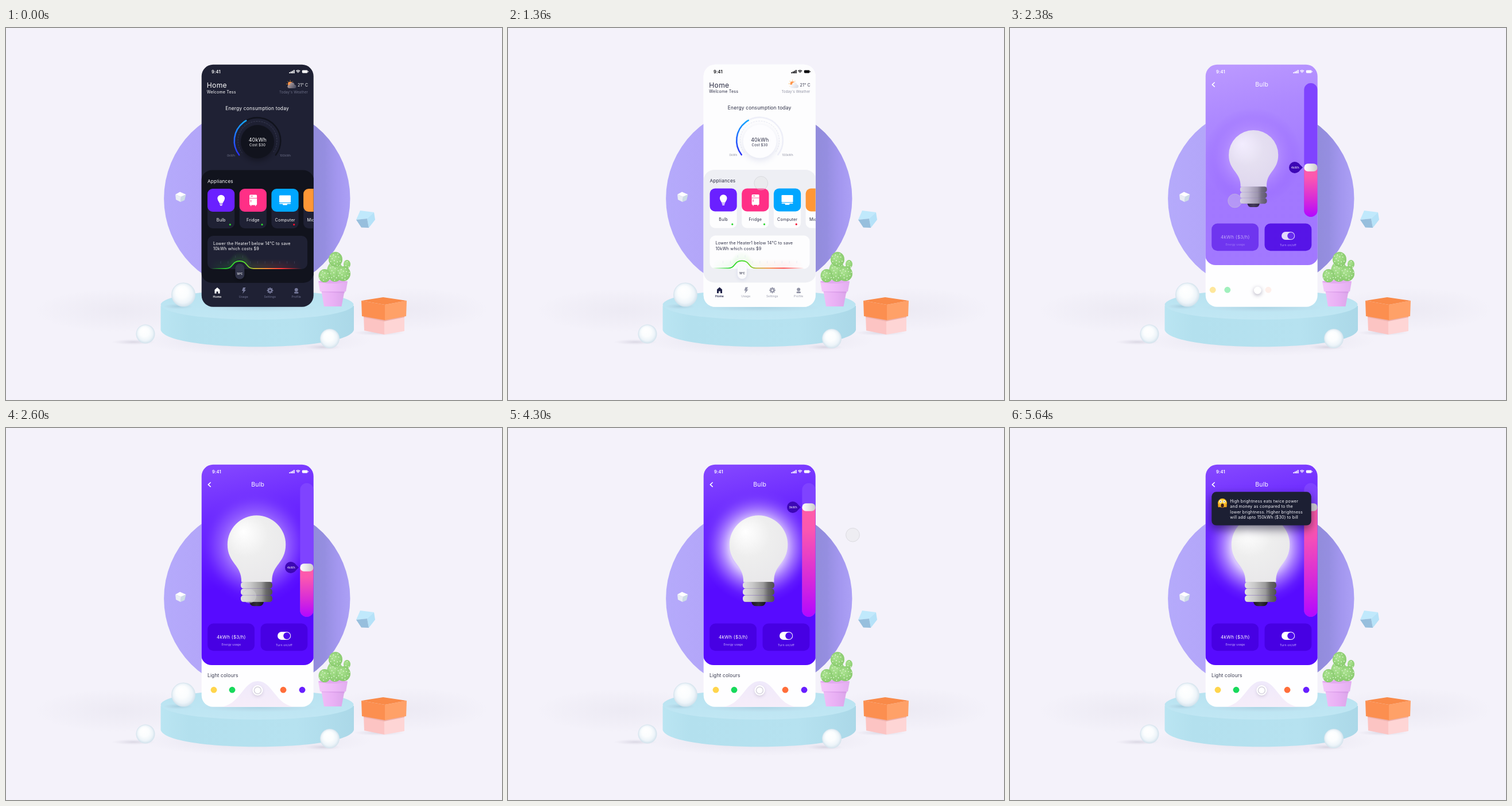
Write an HTML page with a canvas that moves like this. It is 864x648 px and loops after 6.26 s.

```html
<!DOCTYPE html>
<html lang="en">
<head>
<meta charset="utf-8">
<title>Smart home app</title>
<style>
html, body { margin: 0; width: 100%; height: 100%; overflow: hidden; background: #f4f2fa; }
canvas { display: block; }
</style>
</head>
<body>
<canvas id="stage" width="864" height="648"></canvas>
<script>
const LOOP = 6260;
const FONT = 'Inter, "Open Sans", sans-serif';
const stage = document.getElementById('stage').getContext('2d');
let g = stage;

// ---------- helpers ----------
const clamp = v => Math.max(0, Math.min(1, v));
const mix = (a, b, p) => a + (b - a) * p;
const easeOut = p => 1 - (1 - p) ** 2;

function fade(alpha, draw) {
  if (alpha <= 0) return;
  g.save();
  g.globalAlpha *= alpha;
  draw();
  g.restore();
}
function stops(grad, colors) {
  colors.forEach((c, i) => Array.isArray(c) ? grad.addColorStop(c[0], c[1]) : grad.addColorStop(i / (colors.length - 1), c));
  return grad;
}
const linear = (x0, y0, x1, y1, ...c) => stops(g.createLinearGradient(x0, y0, x1, y1), c);
const radial = (x0, y0, x1, y1, r, ...c) => stops(g.createRadialGradient(x0, y0, 0, x1, y1, r), c);

function rect(x, y, w, h, r, fill) {
  g.beginPath();
  g.roundRect(x, y, w, h, r);
  g.fillStyle = fill;
  g.fill();
}
function disc(x, y, rx, fill, ry = rx) {
  g.beginPath();
  g.ellipse(x, y, rx, ry, 0, 0, Math.PI * 2);
  g.fillStyle = fill;
  g.fill();
}
function poly(fill, ...pts) {
  g.beginPath();
  for (let i = 0; i < pts.length; i += 2) g.lineTo(pts[i], pts[i + 1]);
  g.closePath();
  g.fillStyle = fill;
  g.fill();
}
function line(color, width, ...pts) {
  g.beginPath();
  for (let i = 0; i < pts.length; i += 2) g.lineTo(pts[i], pts[i + 1]);
  g.strokeStyle = color;
  g.lineWidth = width;
  g.lineCap = g.lineJoin = 'round';
  g.stroke();
}
function arc(x, y, r, a0, a1, color, width) {
  g.beginPath();
  g.arc(x, y, r, a0, a1);
  g.strokeStyle = color;
  g.lineWidth = width;
  g.stroke();
}
function blob(x, y, rx, ry, color) {
  g.save();
  g.translate(x, y);
  g.scale(rx, ry);
  disc(0, 0, 1, radial(0, 0, 0, 0, 1, color, 'rgba(170,165,190,0)'));
  g.restore();
}
function shadow(color, blur, dy, draw) {
  g.save();
  g.shadowColor = color;
  g.shadowBlur = blur;
  g.shadowOffsetY = dy;
  draw();
  g.restore();
}
// y is the middle of the capitals
function text(s, x, y, size, color, align = 'left', weight = 400) {
  g.font = `${weight} ${size}px ${FONT}`;
  g.letterSpacing = size * 0.025 + 'px';
  g.textAlign = align;
  g.fillStyle = color;
  g.fillText(s, x, y + size * 0.36);
}

// ---------- room ----------
function ball(x, y, r) {
  disc(x, y, r, radial(x - r * .25, y - r * .45, x, y, r, '#ffffff', [.5, '#fbfdfe'], [.8, '#edf4f9'], [1, '#d2e2ec']));
}
function cactus() {
  poly(linear(549, 0, 590, 0, '#efbdf7', '#eab0f5', '#dba6ea'), 549, 456, 590, 456, 584.5, 485, 554, 485);
  poly('rgba(205,140,222,.4)', 549, 458, 591, 458, 590, 462, 550, 460);
  poly(linear(544, 0, 595, 0, '#f4c8fa', '#efbaf8', '#e2aef0'), 544, 442, 595, 442, 592, 459, 547, 459);
  disc(569.5, 442, 25.5, '#e3aaf0', 3);
  const lobes = [[573, 424, 14, 18], [574, 403, 12, 13], [594, 411.5, 6, 7.5], [587.5, 428, 12.5, 13], [555, 431.5, 10.5, 11.5]];
  for (const [x, y, rx, ry] of lobes) {
    disc(x, y, rx, radial(x - rx * .4, y - ry * .4, x, y, ry * 1.1, '#aee394', '#9bd880', '#86c76b'), ry);
    const count = Math.round(rx * ry / 12);
    for (let i = 1; i < count; i++) {
      const a = i * 2.4, d = Math.sqrt(i / count) * .9;
      disc(x + rx * d * Math.cos(a), y + ry * d * Math.sin(a), .85, '#eefbe6');
    }
  }
}
function room() {
  g.fillStyle = '#f4f2fa';
  g.fillRect(0, 0, 864, 648);
  blob(200, 492, 150, 38, 'rgba(185,180,200,.12)');
  blob(700, 490, 140, 38, 'rgba(185,180,200,.12)');
  blob(437, 545, 200, 26, 'rgba(160,160,185,.2)');

  disc(437.3, 297, 162.2, linear(275, 0, 600, 0, '#b5aafb', [.2, '#b3a6f9'], [.8, '#928cdb'], [.86, '#958ee0'], [.93, '#a397ef'], [1, '#aca0f6']));

  // pedestal
  const side = linear(269, 0, 606, 0, '#bae5f2', [.15, '#b3e0ee'], [.7, '#b6e2f0'], [1, '#abd8e8']);
  g.beginPath();
  g.moveTo(269.5, 484);
  g.lineTo(269.5, 526);
  g.bezierCurveTo(280, 565, 595, 565, 606, 526);
  g.lineTo(606, 484);
  g.fillStyle = side;
  g.fill();
  disc(437.5, 482, 168, linear(0, 456, 0, 508, '#b7e2f0', '#c1e7f4'), 26);
  blob(440, 487, 105, 8, 'rgba(120,165,190,.25)');

  blob(222, 547, 38, 5, 'rgba(140,135,160,.25)');
  blob(552, 556, 32, 5, 'rgba(140,135,160,.25)');
  blob(300, 485, 26, 5, 'rgba(110,160,185,.3)');
  ball(309, 464.5, 21);
  ball(243, 533, 16.5);
  ball(564, 541, 17);

  // floating cubes
  poly('#ffffff', 295, 290, 303, 285.5, 313.5, 290, 305, 294);
  poly('#e9edf4', 295, 290, 305, 294, 304, 303, 296, 299);
  poly('#cddce6', 305, 294, 313.5, 290, 311, 300, 304, 303);
  poly('#c0e9fc', 610, 334, 617, 318, 641, 321, 629, 332);
  poly('#b5e2f8', 629, 332, 641, 321, 643, 334, 632, 348);
  poly('#97bfdd', 610, 334, 629, 332, 632, 348, 619, 347.5);

  // gift box
  blob(650, 531, 46, 5, 'rgba(140,135,160,.25)');
  poly('#fcc4c3', 623, 501, 659, 507, 659, 534, 624, 527);
  poly('#fed5d5', 659, 507, 694, 501, 694, 528, 659, 534);
  poly('#eeb2ae', 623, 502, 659, 508, 694, 502, 694, 504, 659, 511, 623, 504);
  poly('#fc8f50', 619, 475, 660, 482, 660, 509, 620, 502);
  poly('#ffa168', 660, 482, 698, 475, 697, 502, 660, 509);
  poly('#f98a48', 619, 475, 657, 469, 698, 475, 660, 482);

  cactus();
}
const backdrop = document.createElement('canvas');
backdrop.width = 864;
backdrop.height = 648;
g = backdrop.getContext('2d');
room();
g = stage;

// ---------- home screen ----------
const DARK = { bg: '#1f2134', panel: '#11131d', card: '#1f2134', ink: '#ffffff', status: '#ffffff', dim: '#6d7088', track: '#11131d', dash: '#3d4058',
  disc: '#11131d', depth: 'rgba(0,0,0,.35)', heat: .075, thumb: '#303348', active: '#ffffff', icon: '#777a9b', cloud: ['#b9a6a6', '#4c4f63'], dx: 0 };
const LIGHT = { bg: '#fdfdfe', panel: '#eeeff4', card: '#fdfdfe', ink: '#292b42', status: '#08080c', dim: '#8f91a2', track: '#eeeff8', dash: '#e6e7f1',
  disc: '#fdfdff', depth: 'rgba(120,130,190,.2)', heat: .04, thumb: '#fbfbfd', active: '#22244a', icon: '#9496a8', cloud: ['#ffffff', '#d9dbe4'], dx: .5 };

function statusBar(color, x) {
  text('9:41', x, 76, 7.5, color, 'left', 600);
  for (let i = 0; i < 4; i++) rect(493.3 + i * 2.5, 77 - i * 1.3, 1.8, 1.9 + i * 1.3, .5, color);
  for (let i = 0; i < 3; i++) arc(508.7, 78.4, .8 + i * 2, -Math.PI * .75, -Math.PI * .25, color, 1.3);
  rect(515.8, 73.4, 9.6, 5, 1.4, color);
  rect(526, 75, .9, 1.9, .4, color);
}
function weather(th) {
  for (let i = 0; i < 8; i++) {
    const a = i * Math.PI / 4, c = Math.cos(a), s = Math.sin(a);
    line('#ffa93a', .9, 495 + c * 5.4, 97.5 + s * 5.4, 495 + c * 6.3, 97.5 + s * 6.3);
  }
  disc(495, 97.5, 4, '#ff9448');
  const fill = linear(492, 96, 503, 105, ...th.cloud);
  disc(498.5, 99, 4, fill);
  rect(490.5, 99, 15, 6, 3, fill);
}
function gauge(th) {
  const start = 2.48, end = 2 * Math.PI + .66;
  arc(438, 196.5, 40.3, start, end, th.track, 2.6);
  arc(438, 196.5, 40.3, start, 4.2, linear(0, 224, 0, 160, '#2c2cf5', '#2368ff', '#14aaff'), 2.6);
  g.setLineDash([2, 2.6]);
  arc(438, 196.5, 34, start, end, th.dash, 1);
  g.setLineDash([]);
  shadow(th.depth, 12, 4, () => disc(438, 198, 29, th.disc));
  text('40kWh', 438.3, 195, 8.9, th.ink, 'center');
  text('Cost $30', 438, 204, 6.1, th.ink, 'center');
  text('0kWh', 385, 222, 4.9, th.dim);
  text('100kWh', 477, 222, 4.9, th.dim);
}
function bulbIcon(x, y) {
  disc(x, y - 3, 6.3, '#fff');
  poly('#fff', x - 5.5, y, x + 5.5, y, x + 2.8, y + 5, x - 2.8, y + 5);
  rect(x - 2.8, y + 5.7, 5.6, 1.6, .8, '#fff');
  rect(x - 2, y + 7.9, 4, 1.5, .7, '#fff');
}
function fridgeIcon(x, y, color) {
  rect(x - 6.5, y - 9.5, 13, 18, 1.5, '#fff');
  line('#fff', 1.5, x - 4, y + 9, x - 4, y + 9.5);
  line('#fff', 1.5, x + 4, y + 9, x + 4, y + 9.5);
  line(color, .8, x - 6, y - 3.5, x + 6, y - 3.5);
  line(color, 1, x - 4, y - 7, x - 1, y - 7);
  line(color, 1, x - 4, y - .5, x - 4, y + 3);
}
function monitorIcon(x, y) {
  rect(x - 10, y - 8.5, 20, 12.5, 1.3, '#fff');
  rect(x - 10, y + 5, 20, 1.6, .8, '#fff');
  rect(x - 4, y + 6, 8, 2.4, .8, '#fff');
}
function appliances(th) {
  const list = [['Bulb', '#6a20ff', '#2bd52f'], ['Fridge', '#ff2f86', '#2bd52f'], ['Computer', '#00a6ff', '#f5102f'], ['Microwave', '#ff9736', '#2bd52f']];
  list.forEach(([name, color, lamp], i) => {
    const x = 351 + i * 55.7;
    rect(x, 290, 47.2, 59, 9, th.card);
    rect(x, 280, 47.2, 40, 9, color);
    if (i < 3) text(name, x + 23.7, 334, 7.2, th.ink, 'center');
    else text(name, 524.5, 334, 7.2, th.ink);
    disc(x + 39.3, 342.4, 1.6, lamp);
  });
  bulbIcon(374.7, 300);
  fridgeIcon(430.6, 300, '#ff2f86');
  monitorIcon(486, 300);
}
function heatPath(dy) {
  g.beginPath();
  g.moveTo(351, 419 - dy);
  g.lineTo(383, 419 - dy);
  g.bezierCurveTo(396, 419 - dy, 393, 406 - dy, 407, 406 - dy);
  g.bezierCurveTo(421, 406 - dy, 418, 419 - dy, 431, 419 - dy);
  g.lineTo(525, 419 - dy);
}
function heater(th) {
  rect(351, 362, 174, 58, 10, th.card);
  text('Lower the Heater1 below 14°C to save', 361, 375.2, 7.2, th.ink);
  text('10kWh which costs $9', 361, 384.6, 7.2, th.ink);
  g.save();
  g.beginPath();
  g.roundRect(351, 362, 174, 58, 10);
  g.clip();
  g.strokeStyle = linear(355, 0, 515, 0, 'rgba(40,215,40,0)', [.2, '#27d82d'], [.38, '#59dd33'], [.5, '#c6ae31'], [.62, '#f78537'], [.78, '#ff3a3a'], [1, 'rgba(255,40,40,0)']);
  for (let i = 1; i < 7; i++) fade(th.heat * (1 - i / 8), () => { heatPath(i * 2.2); g.lineWidth = 5; g.stroke(); });
  heatPath(0);
  g.lineWidth = 1.8;
  g.stroke();
  for (let i = 0; i < 11; i++) {
    const x = 374 + i * 12.85, lift = i === 2 || i === 3 ? 10 : 0;
    line(th.dash, .8, x, 406.5 - lift, x, 410 - lift);
  }
  g.restore();
  shadow(th.depth, 6, 2, () => rect(399.3, 410.5, 16, 27, 8, th.thumb));
  for (let i = 0; i < 9; i++) disc(404 + i % 3 * 3.2, 415.5 + Math.floor(i / 3) * 3, .6, th.dash);
  text('18°C', 407.2, 428.3, 4.2, th.ink, 'center', 600);
}
function nav(th) {
  poly(th.active, 368, 452, 372.5, 456, 372.5, 462.5, 369.5, 462.5, 369.5, 459, 366.5, 459, 366.5, 462.5, 363.5, 462.5, 363.5, 456);
  poly(th.icon, 413, 452, 417.5, 452, 415.5, 456, 418, 456, 412, 463, 413.5, 458, 411, 458);
  for (let i = 0; i < 4; i++) {
    const c = Math.cos(i * Math.PI / 4) * 4.2, s = Math.sin(i * Math.PI / 4) * 4.2;
    line(th.icon, 2.4, 460 - c, 457.3 - s, 460 + c, 457.3 + s);
  }
  disc(460, 457.3, 1.6, th.bg);
  disc(505.7, 456, 3, th.icon);
  rect(502, 459.5, 7.5, 3, 1.5, th.icon);
  ['Home', 'Usage', 'Settings', 'Profile'].forEach((s, i) =>
    text(s, 368 + i * 45.9, 467.8, 5.1, i ? th.icon : th.active, 'center', i ? 400 : 600));
}
function home(th) {
  rect(340, 63, 197, 424, 0, th.bg);
  statusBar(th.status, 358);
  g.save();
  g.translate(th.dx, -th.dx);
  text('Home', 349.8, 100, 12.1, th.ink);
  text('Welcome Tess', 349.8, 111.2, 7.1, th.ink);
  weather(th);
  text('21° C', 508, 99.8, 7, th.ink);
  text("Today's Weather", 526, 111.4, 6, th.dim, 'right');
  text('Energy consumption today', 437.6, 139.5, 8.35, th.ink, 'center');
  gauge(th);
  rect(340, 247.5, 196.5, 196.5, 19, th.panel);
  text('Appliances', 351, 267, 8.2, th.ink);
  appliances(th);
  heater(th);
  nav(th);
  g.restore();
}

// ---------- bulb screen ----------
function bulb() {
  rect(424, 302.5, 25, 7.7, [0, 0, 10, 10], linear(424, 0, 449, 0, '#1c1626', '#33303a', '#15121c'));
  g.beginPath();
  g.moveTo(410, 268.2);
  g.bezierCurveTo(411, 238, 385.8, 236, 385.8, 203);
  g.arc(436.5, 203, 50.7, Math.PI, 0);
  g.bezierCurveTo(487.2, 236, 462, 238, 463.5, 268.2);
  g.closePath();
  g.fillStyle = radial(413, 180, 425, 195, 75, '#ffffff', [.25, '#f7f7f7'], [.5, '#eeeeee'], [1, '#e9e8ea']);
  g.fill();
  const metal = linear(409, 0, 464, 0, '#e2e2e2', [.3, '#cacaca'], [.65, '#9b9b9b'], [.8, '#6a6a6a'], [1, '#4f4f4f']);
  for (let y = 268; y < 300; y += 11.7) {
    rect(409, y, 55, 11.7, 5, metal);
    line('rgba(90,90,90,.4)', .6, 413, y + 11.6, 460, y + 11.6);
  }
}
function glow(power) {
  disc(435, 207, 100, radial(435, 207, 435, 207, 100, [0, `rgba(205,180,255,${mix(.75, 1, power)})`],
    [.5, `rgba(${mix(190, 222, power)},${mix(155, 205, power)},255,${mix(.65, .95, power)})`],
    [.72, `rgba(165,120,255,${mix(.34, .62, power)})`], [.88, `rgba(135,80,255,${mix(.1, .2, power)})`], [1, 'rgba(120,60,255,0)']));
}
function slider(level) {
  const y = mix(243, 138, level);
  rect(512.3, 96, 23.3, 233, 11.6, '#7f43ff');
  rect(512.3, y, 23.3, 329 - y, [0, 0, 11.6, 11.6], linear(0, y, 0, 329, '#ff5da6', [.2, '#fb57b0'], [.65, '#d72bd8'], [1, '#b308ff']));
  rect(512.3, y - 6.7, 23.3, 13.4, 6.6, linear(512, 0, 536, 0, '#ffffff', '#e8e8e8', '#c9c9c9'));
  poly('#3c07b5', 502, y - 8, 510, y, 502, y + 8);
  disc(496, y, 10, '#3c07b5');
  text(Math.round(mix(4, 9, level)) + 'kWh', 496.8, y, 4.9, '#fff', 'center');
}
function colours(t, p) {
  fade(clamp((t - .6) / .4), () => {
    g.beginPath();
    g.moveTo(372, 486);
    g.bezierCurveTo(408, 484, 412, 441, 438.5, 441);
    g.bezierCurveTo(465, 441, 469, 484, 505, 486);
    g.fillStyle = linear(0, 440, 0, 486, '#efe9fb', '#f6edf9');
    g.fill();
    text('Light colours', 351, 431.3, 8.3, '#33354a');
  });
  [[362, '#ffd54d'], [394, '#18d95c'], [483, '#ff6e3a'], [516, '#681fff']].forEach(([x, color], i) =>
    fade(clamp((t - .25 * i) / (1 - .25 * i)), () => disc(mix(318, x, p), 456.2, 5.4, color)));
  const x = mix(403, 438.4, p);
  fade(clamp(t * 2), () => shadow('rgba(60,50,90,.4)', 7, 2, () => disc(x, 457, 6.5, '#fff')));
  fade(clamp((t - .6) / .4), () => {
    disc(x, 457, 9, '#ffffff');
    arc(x, 457, 6, 0, 7, '#d6d3de', 1.6);
  });
}
function bulbScreen(t, level) {
  const p = easeOut(t), scale = mix(.25, 1, p);
  fade(t, () => {
    rect(340, 63, 197, 350, [0, 0, 18, 18], linear(400, 64, 445, 262, '#8345ff', [.4, '#6c2aff'], [1, '#570bff']));
    rect(351.2, 340.6, 81.8, 47.6, 10, '#4700e3');
    text('4kWh ($3/h)', 392.4, 364, 8.1, '#fff', 'center');
    text('Energy usage', 392.4, 377.6, 5, '#c9b4ff', 'center');
  });
  fade(clamp(t * 1.5), () => {
    rect(443.5, 340.6, 81.8, 47.6, 10, '#4700e3');
    rect(473, 355, 23.2, 14, 7, '#fff');
    disc(489.2, 362, 6, '#4e08ec');
    text('Turn on/off', 484.4, 377.8, 5.2, '#c9b4ff', 'center');
  });
  fade(clamp(t * 1.5), () => {
    g.translate(mix(375, 436.5, p), mix(300, 231, p));
    g.scale(scale, scale);
    g.translate(-436.5, -231);
    glow(level);
    bulb();
  });
  fade(clamp(t * 2), () => {
    statusBar('#fff', 359);
    line('#fff', 1.6, 356.2, 95, 352.3, 98.6, 356.2, 102.2);
    text('Bulb', 438.7, 98.5, 10.4, '#fff', 'center');
    slider(level);
  });
  colours(t, p);
}
function notice(ms) {
  const turn = ms / 250;
  const y = 111.2 + 88 * Math.exp(-1.39 * turn) * Math.cos(Math.PI * turn);
  fade(clamp(ms / 180), () => {
    shadow('rgba(15,10,40,.55)', 16, 7, () => rect(351.3, y, 173.4, 58.3, 8, '#1c1f33'));
    disc(370, y + 19.5, 8, radial(368, y + 15, 370, y + 19.5, 9, '#ffdc45', '#f9b51f'));
    for (const side of [-1, 1]) {
      disc(370 + side * 3.2, y + 16.8, 2.3, '#fff');
      disc(370 + side * 3.2, y + 17, .8, '#2b2118');
      disc(370 + side * 6, y + 24, 1.7, '#f0a11b', 3);
    }
    disc(370, y + 23.6, 2.7, '#43201b', 3.5);
    ['High brightness eats twice power', 'and money as compared to the', 'lower brightness. Higher brightness', 'will add upto 150kWh ($30) to bill']
      .forEach((s, i) => text(s, 383.3, y + 16.2 + i * 9.35, 7.15, '#f4f4fa'));
  });
}

// ---------- pointer ----------
const route = [[200, 776, -4], [840, 580, 87], [1360, 441, 270], [1480, 419, 285], [2040, 382, 307], [2160, 382, 307],
  [2380, 391.5, 301], [2800, 456, 273], [3140, 507, 170], [3440, 517, 162], [3520, 522, 157.5], [3720, 522, 157.5],
  [4300, 600.5, 186.2], [5160, 600.5, 186.2], [5640, 838, -14]];

function slope(i, k) {
  const a = route[i - 1], b = route[i], c = route[i + 1];
  if (!a || !c || a[1] === b[1] || b[1] === c[1]) return 0;
  return (c[k] - a[k]) / (c[0] - a[0]);
}
function pointer(ms) {
  const i = route.findIndex((r, n) => n && ms < r[0]) - 1;
  if (ms < route[0][0] || i < 0) return;
  const a = route[i], b = route[i + 1], d = b[0] - a[0], u = (ms - a[0]) / d;
  const at = k => a[k] * (1 + 2 * u) * (1 - u) ** 2 + b[k] * u * u * (3 - 2 * u)
    + d * u * (1 - u) * (slope(i, k) * (1 - u) - slope(i + 1, k) * u);
  const x = at(1), y = at(2);
  disc(x, y, 12, 'rgba(224,224,226,.3)');
  arc(x, y, 11.9, 0, 7, 'rgba(200,200,205,.55)', .9);
}

// ---------- playback ----------
function draw(ms) {
  const open = clamp((ms - 2160) / 400);
  const level = easeOut(clamp((ms - 3720) / 420));
  g.drawImage(backdrop, 0, 0);
  g.save();
  g.beginPath();
  g.roundRect(340.7, 63.8, 195, 422, 20);
  g.clip();
  if (ms < 200) home(DARK);
  else {
    rect(340, 63, 197, 424, 0, '#fefeff');
    fade(1 - open / .4, () => home(LIGHT));
    if (open > 0) bulbScreen(open, level);
  }
  if (ms >= 4560) notice(ms - 4560);
  g.restore();
  pointer(ms);
}
const began = performance.now();
function tick() {
  draw((performance.now() - began) % LOOP);
  requestAnimationFrame(tick);
}
tick();
</script>
</body>
</html>
```
